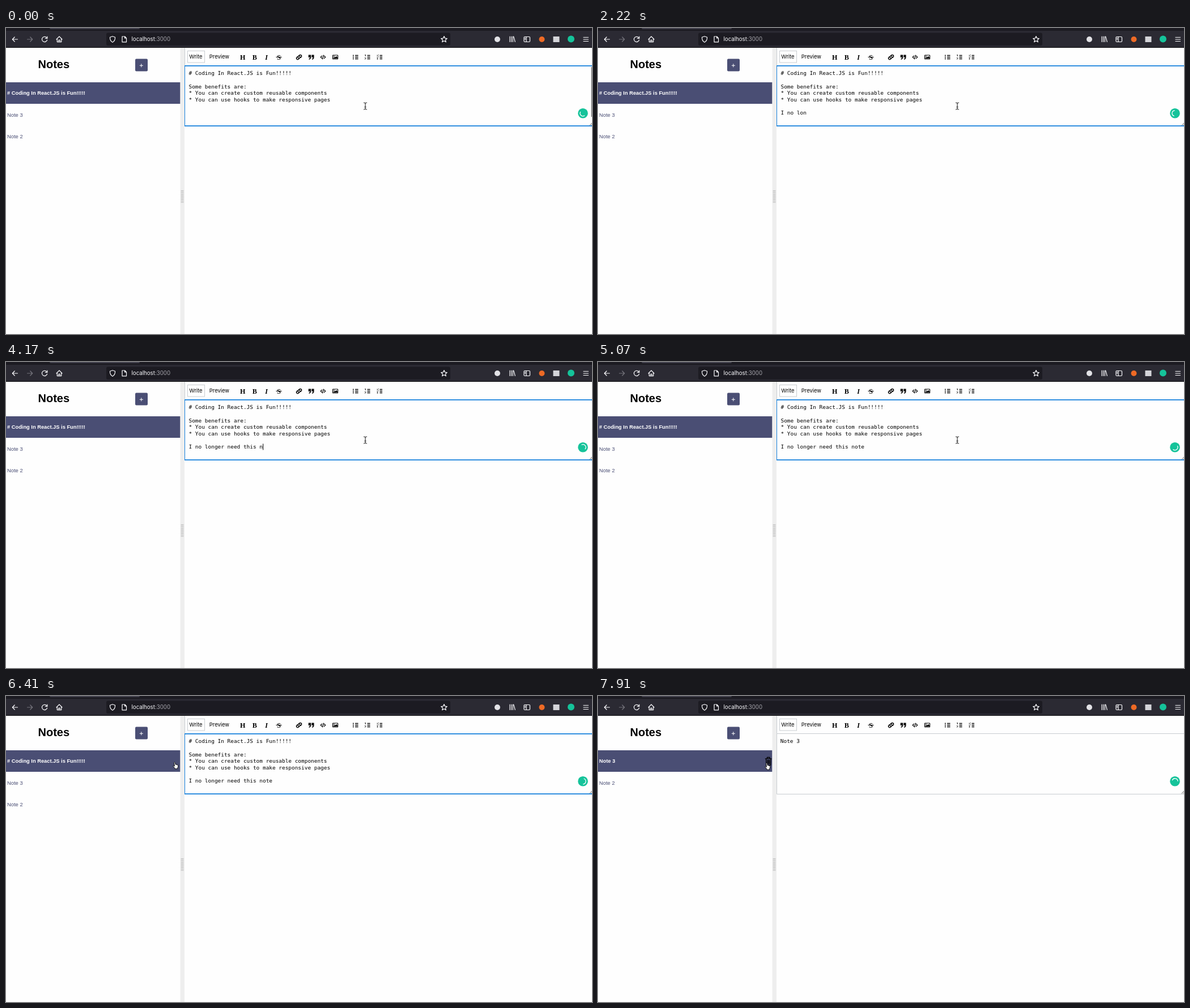
Write an HTML page that moves like this. It is 1034 px wide and 541 px high and loops after 8 s.

```html
<!DOCTYPE html>
<html lang="en">
<head>
<meta charset="utf-8">
<title>Notes</title>
<style>
  html, body { margin: 0; width: 100%; height: 100%; overflow: hidden; background: #fefefe; }
  svg { display: block; width: 100vw; height: 100vh; }
  text { white-space: pre; }
  .ui { font-family: Inter, Roboto, sans-serif; font-size: 9.4px; }
  .side { font-family: "Liberation Sans", Arial, sans-serif; font-size: 9.4px; fill: #4a4e74; }
  .side.on { font-weight: bold; font-size: 9.3px; fill: #fff; }
  .mono { font-family: "DejaVu Sans Mono", monospace; font-size: 9.43px; }
  .slab { font-family: "Liberation Serif", serif; font-weight: bold; font-size: 12px; }
  .line { fill: none; stroke-linecap: round; stroke-linejoin: round; }
</style>
</head>
<body>
<svg viewBox="0 0 1034 541">
  <rect width="1034" height="541" fill="#fefefe"/>

  <!-- browser bar -->
  <rect width="1034" height="35" fill="#2b2a33"/>
  <rect width="1034" height="5" fill="#1c1b22"/>
  <rect x="77" y="-4" width="159" height="6" rx="2" fill="#42414d"/>
  <rect y="34" width="1034" height="1" fill="#0c0c0d"/>
  <rect x="177" y="8.5" width="607" height="22.5" rx="3" fill="#1c1b22"/>
  <g class="line" stroke="#fbfbfe" stroke-width="1.2">
    <path d="M20.5 20H11.5M15.2 16L11.3 20L15.2 24"/>
    <path d="M37.5 20H46.5M42.8 16L46.7 20L42.8 24" stroke="#76757d"/>
    <path d="M72 17.5A4.6 4.6 0 1 0 72.6 21M72.8 15V18.4H69.4"/>
    <path d="M89 20L94 15L99 20M90.3 19V24.6H97.7V19M92.8 24.5V21.3H95.2V24.5"/>
    <path d="M188 14.7L192.5 16.2C192.8 20.5 191.2 23.4 188 25.2C184.800 23.4 183.200 20.500 183.500 16.200Z"/>
    <path d="M205 15H209.700L212.500 17.800V24.800H205ZM209.500 15.200V18H212.300"/>
    <path d="M773 14.600L774.500 18.100L778.300 18.500L775.500 21L776.300 24.800L773 22.800L769.700 24.800L770.500 21L767.700 18.500L771.500 18.100Z"/>
    <path d="M889 15V24.500M891.700 15V24.500M894.400 15V24.500M895.800 15.200L898.300 24.500"/>
    <rect x="914" y="15.500" width="10.500" height="9" rx="1.500"/>
    <path d="M918 15.500V24.500M915.300 18H916.700M915.300 20H916.700"/>
    <path d="M1019 16.500H1027.500M1019 20H1027.500M1019 23.500H1027.500"/>
  </g>
  <circle cx="867" cy="20" r="5" fill="#e2e2e6"/>
  <circle cx="945.5" cy="20" r="5" fill="#ee6a25"/>
  <rect x="965.500" y="15" width="11" height="10" fill="#d4d4d9"/>
  <circle cx="997" cy="19.500" r="6" fill="#15c39a"/>
  <text class="ui" x="221.500" y="23.300" fill="#fbfbfe" style="font-size:9.7px">localhost<tspan fill="#a5a4ab">:3000</tspan></text>

  <!-- sidebar -->
  <text class="side" x="56.500" y="71" style="font-size:20px;font-weight:bold;fill:#000">Notes</text>
  <rect x="228" y="54.500" width="22" height="22" rx="2" fill="#4a4e74"/>
  <path d="M235.800 66.300H241.800M238.800 63.300V69.300" stroke="#fff"/>
  <rect y="96" width="307.500" height="38" fill="#4a4e74"/>
  <text class="side on" x="2" y="117.500" id="item0"></text>
  <text class="side" x="2" y="156.500" id="item1"></text>
  <text class="side" x="2" y="194.800" id="item2"></text>
  <g id="trash" class="line" stroke="#000" stroke-width="1.300">
    <path d="M295.300 110.800H306M298.400 110.500V108.500H303V110.500M296.500 111L297 122.300H304.500L305 111M299 113.300V120M300.800 113.300V120M302.600 113.300V120"/>
  </g>
  <rect x="307.500" y="35" width="7.500" height="506" fill="#eee"/>
  <path d="M311 287V310" stroke="#b9b9b9" stroke-width="5" stroke-dasharray="1 1.300"/>

  <!-- editor toolbar -->
  <path d="M315.500 35V66.500H1034" fill="none" stroke="#c8ccd0"/>
  <rect x="320.500" y="40.500" width="30" height="20.500" fill="#fff" stroke="#c8ccd0"/>
  <text class="ui" x="323.300" y="54.400">Write</text>
  <text class="ui" x="358.800" y="54.400">Preview</text>
  <g class="slab">
    <text x="412.900" y="55.500">H</text>
    <text x="434.800" y="55.500">B</text>
    <text x="457.300" y="55.500" font-style="italic">I</text>
    <text x="478.200" y="55.500">S</text>
  </g>
  <path d="M476.500 51.500H486.500" stroke="#000"/>
  <g class="line" stroke="#000" stroke-width="1.500">
    <path id="link" d="M516.200 53.300C514.700 52 515 50.800 516 49.800L517.700 48.100C520 46.300 522.700 49 520.900 51.200L520 52.200M517.800 49.800C519.300 51.100 519 52.300 518 53.300L516.300 55C514 56.800 511.300 54.100 513.100 51.900L514 50.900"/>
    <path d="M557.500 49.300L555.200 51.500L557.500 53.700M561.300 49.300L563.600 51.500L561.300 53.700M560.200 48L558.600 55" stroke-width="1.200"/>
    <rect x="576.500" y="48" width="9" height="7" rx=".8" stroke-width="1.200"/>
    <path d="M616 48.500H621.500M616 51.500H621.500M616 54.500H621.500M637.500 48.500H642.500M637.500 51.500H642.500M637.500 54.500H642.500M659.500 48.500H664M659.500 51.500H664M659.500 54.500H664" stroke-width="1.300" stroke-linecap="butt"/>
    <path d="M612.800 48.500h.01M612.800 51.500h.01M612.800 54.500h.01M655.500 54.500h.01" stroke-width="2"/>
    <path d="M633.500 47.700L634.300 47.300V49.700M633.300 52.500C635.500 51.800 635.300 55.500 633.300 55.200M654.600 48.300L655.500 49.200L657.200 47.300M654.600 51.500L655.500 52.400L657.200 50.500" stroke-width=".9"/>
  </g>
  <path d="M577.500 54V53L579.300 51.300L580.300 52.200L582.700 49.800L584.700 51.800V54Z"/>
  <circle cx="578.900" cy="50" r=".9"/>
  <path id="quote" d="M533.700 47.500H538V52C538 54.300 536.700 55.600 534.500 55.700V54.200C535.800 54 536.200 53.200 536.200 52H533.700Z"/>
  <path d="M539.200 47.500H543.500V52C543.500 54.300 542.200 55.600 540 55.700V54.200C541.300 54 541.700 53.200 541.700 52H539.200Z"/>

  <!-- editor -->
  <path d="M1029.500 172.500L1034 168M1032 172.500L1034 170.500" stroke="#777"/>
  <g id="blurred" fill="none" stroke="#c8ccd0"><path d="M315.500 66.500V173.500H1034"/></g>
  <g id="focused" fill="none" stroke="#1580dc">
    <path d="M315.500 66V174"/>
    <path d="M315 66.800H1034M315 173.200H1034" stroke-width="1.800"/>
  </g>
  <rect id="scrollbar" x="1032.700" y="69" width="1.300" height="88" fill="#777"/>
  <g id="lines" class="mono"></g>
  <rect id="caret" y="144.500" width="1" height="11" fill="#000"/>
  <circle cx="1018" cy="150.800" r="8.800" fill="#15c39a"/>
  <path id="spinner" class="line" stroke="#fff" stroke-width="1.300" d="M1.300 -4.830A5 5 0 0 1 1.300 4.830"/>

  <!-- pointers -->
  <path id="beam" class="line" stroke="#222" stroke-width="1.100" d="M-2.600 -6Q-.2 -6 0 -4.500Q.2 -6 2.600 -6M0 -4.500V4.500M-2.600 6Q-.2 6 0 4.500Q.2 6 2.600 6M-1.200 1.800H1.200"/>
  <path id="hand" fill="#fff" stroke="#000" stroke-width=".9" stroke-linejoin="round" d="M-2.400 -5.200Q-1.300 -6.600 -.5 -5.200L.2 -1.800Q1.200 -2.600 1.800 -1.500Q2.900 -2.100 3.300 -1Q4.600 -1.300 4.700 .3Q4.800 2.800 3.600 4.300V5.700H-1.200V4.600L-3.900 1.200Q-4.300 -.3 -2.800 .1L-1.500 1.200Z"/>
</svg>

<script>
const LOOP = 8000, CHAR = 5.68, LEFT = 322.5;
const TRASH_AT = 6710, BLUR_AT = 7160, DELETE_AT = 7460;
const title = "# Coding In React.JS is Fun!!!!!";
const body = [title, "", "Some benefits are:",
  "* You can create custom reusable components",
  "* You can use hooks to make responsive pages", ""];
const sentence = "I no longer need this note";

// Bursts of typing: start, gap between keys, number of keys
const bursts = [[890, 150, 2], [1190, 90, 6], [2370, 112, 9], [3420, 150, 7], [4470, 75, 2]];
const keyTimes = bursts.flatMap(([start, gap, n]) => Array.from({ length: n }, (_, i) => start + i * gap));

// Pointer path: time, x, y
const path = [[5220, 634, 138], [5370, 590, 127], [5520, 510, 108], [5670, 425, 90],
  [5820, 355, 81], [5960, 312, 88], [6110, 300, 108], [6260, 299, 120], [6410, 299, 123], [6710, 299, 124.5]];

const $ = id => document.getElementById(id);
const show = (id, on) => $(id).setAttribute("visibility", on ? "visible" : "hidden");
const move = (id, x, y, angle = 0) => $(id).setAttribute("transform", `translate(${x} ${y}) rotate(${angle})`);
const setText = (node, value) => { if (node.textContent !== value) node.textContent = value; };

const lines = Array.from({ length: 7 }, (_, i) => {
  const line = document.createElementNS("http://www.w3.org/2000/svg", "text");
  line.setAttribute("y", 83.4 + i * 11.62);
  return $("lines").appendChild(line);
});

// The screen refreshes about every 150 ms, with two small slips
function snap(t) {
  const shift = t < 1620 ? 10 : t < 5960 ? 30 : 40;
  return Math.max(0, Math.floor((t + shift) / 150) * 150 - shift);
}

function pointerAt(t) {
  const next = path.findIndex(p => p[0] > t);
  if (next === 0) return path[0].slice(1);
  if (next < 0) return path[path.length - 1].slice(1);
  const [t0, x0, y0] = path[next - 1], [t1, x1, y1] = path[next];
  const k = (t - t0) / (t1 - t0);
  return [x0 + (x1 - x0) * k, y0 + (y1 - y0) * k];
}

function draw(t) {
  const deleted = t >= DELETE_AT, focused = t < BLUR_AT;
  const typed = keyTimes.filter(k => k <= t).length;
  const lastKey = typed ? keyTimes[typed - 1] : -600;

  const items = deleted ? ["Note 3", "Note 2", ""] : [title, "Note 3", "Note 2"];
  items.forEach((name, i) => setText($("item" + i), name));

  const content = deleted ? ["Note 3"] : [...body, sentence.slice(0, typed)];
  lines.forEach((line, i) => {
    line.setAttribute("x", deleted ? LEFT - 0.7 : LEFT);
    setText(line, content[i] || "");
  });

  show("focused", focused);
  show("blurred", !focused);
  show("caret", focused && (t - lastKey) % 1000 < 500);
  $("caret").setAttribute("x", LEFT + typed * CHAR);
  $("scrollbar").setAttribute("opacity", Math.min(1, Math.max(0, (590 - t) / 300)));
  move("spinner", 1018, 150.8, 132 - 0.3 * t);

  const [x, y] = pointerAt(t), overList = x < 308;
  show("trash", t >= TRASH_AT);
  show("beam", !overList);
  show("hand", overList);
  move(overList ? "hand" : "beam", x, y);
}

function tick() {
  draw(snap(performance.now() % LOOP));
  requestAnimationFrame(tick);
}
tick();
</script>
</body>
</html>
```
